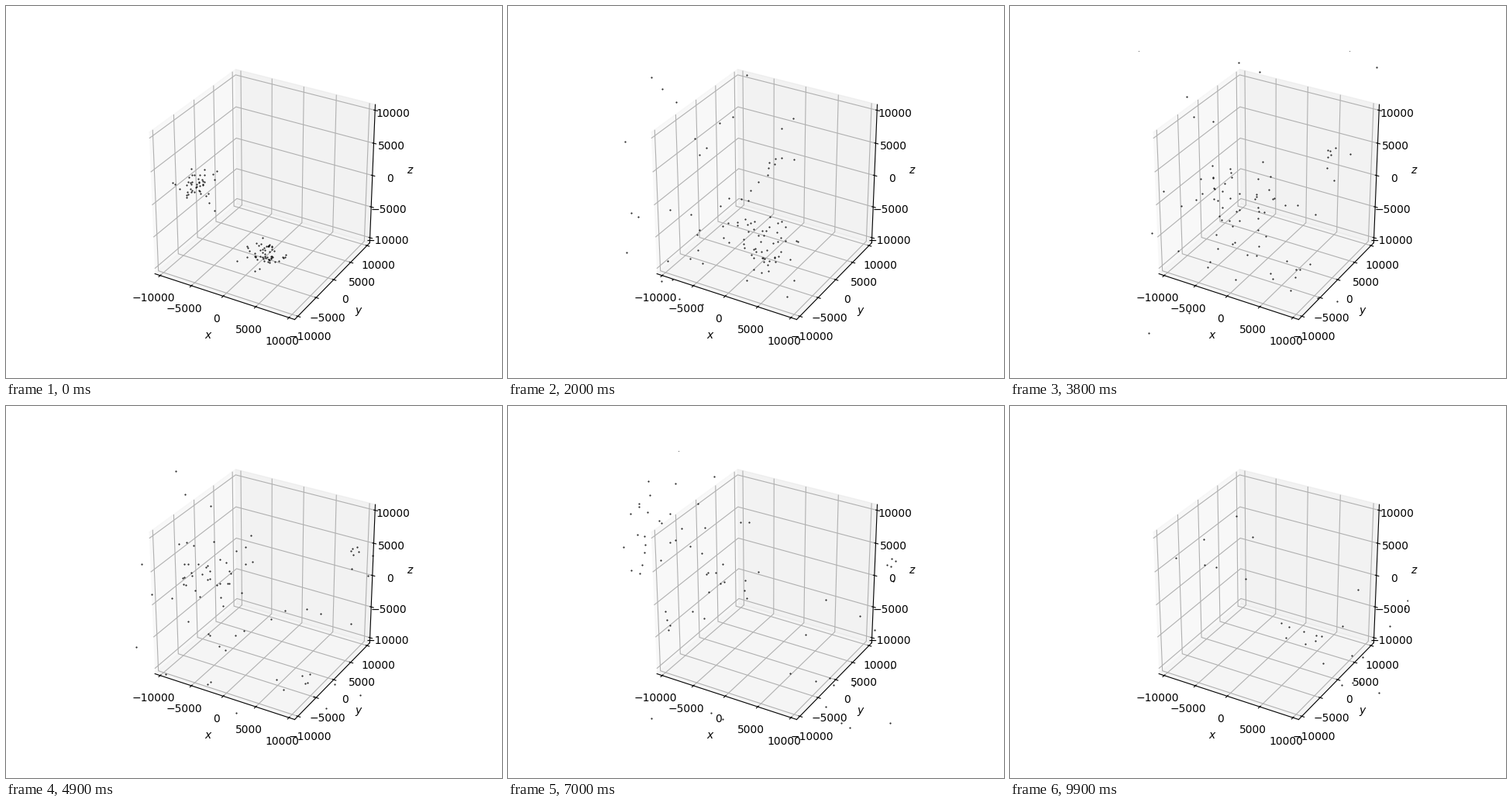
A matplotlib script that plays this animation: 640 by 480 pixels, repeating every 10000 ms.

```python
import numpy as np
import matplotlib.pyplot as plt
from matplotlib.animation import FuncAnimation

FRAMES, INTERVAL = 100, 100
TICK, PAD = 10000, 25 / 24
LIMIT = TICK * PAD ** 2
t = np.arange(FRAMES)[:, None, None]

rng = np.random.default_rng(11)

# View plane of the default camera (elev 30, azim -60)
RIGHT = np.array([np.sqrt(3) / 2, 0.5, 0])
UP = np.array([-0.25, np.sqrt(3) / 4, np.sqrt(3) / 2])
CENTRE = np.array([333.0, 237.4])
SCALE = 2 * TICK * PAD / 199.8

# Clusters on the stage: middle and spread in pixels
WEST = np.array([(247, 233), (14, 14)])
EAST = np.array([(333, 321), (13, 9)])


def to_space(p):
    """Stage pixels to data coordinates on the plane facing the camera."""
    u, v = np.moveaxis((p - CENTRE) * SCALE, -1, 0)
    return u[..., None] * RIGHT - v[..., None] * UP


def circle(angle):
    return np.stack([np.cos(angle), np.sin(angle)], -1)


def stream(n, home, velocity=(0, 0), pull=(0, 0), speed=(0, 0), growth=0, hold=0):
    """Bodies leaving a cluster together.

    speed is the range of each body's own random kick, growth widens the
    group, and hold is the time over which the cluster lets it go.
    """
    middle, spread = home
    kick = rng.uniform(*speed, (n, 1)) * circle(rng.uniform(0, 2 * np.pi, n))
    travel = (np.array(velocity) + kick) * t + np.array(pull) * t ** 2
    if hold:
        u = np.minimum(t / hold, 1)
        travel = travel * u * u * (3 - 2 * u)
    swirl = rng.uniform(0, 2 * np.pi, n) + t[..., 0] * rng.normal(0, 0.03, n)
    offset = rng.rayleigh(1, (n, 1)) * circle(swirl)
    return middle + travel + offset * (spread + growth * np.sqrt(t))


bodies = np.concatenate([
    # East: most drift to the upper left, the rest part in smaller groups
    stream(24, EAST, (-0.6, -1.2), (-0.022, -0.018), growth=2.2, hold=49),
    stream(9, EAST, (-3.36, -3.63), (0.04, 0.033), growth=1, hold=49),
    stream(8, EAST, (-1.5, -4.2), (0.008, 0.0265), growth=3.5, hold=49),
    stream(8, EAST, (1, 0.45), growth=4, hold=49),
    stream(6, EAST, pull=(-0.023, -0.01), growth=1, hold=49),
    # West: bursts apart, one group swings off to the right
    stream(7, WEST, (5.5, -1.9), (-0.028, 0.022)),
    stream(38, WEST, speed=(2, 8)),
], axis=1)
space = to_space(bodies)

fig = plt.figure(figsize=(6.4, 4.8), dpi=100)
ax = fig.add_subplot(projection="3d")
dots, = ax.plot(*space[0].T, "k.", markersize=1)

for name in "xyz":
    ax.set(**{f"{name}ticks": np.arange(-TICK, TICK + 1, 5000),
              f"{name}lim": (-LIMIT, LIMIT),
              f"{name}label": f"${name}$"})
# Unit cube
ax.set_box_aspect((1, 1, 1), zoom=np.sqrt(3) / 1.8294640721620434)


def update(i):
    dots.set_data_3d(*space[i].T)
    return dots,


anim = FuncAnimation(fig, update, frames=FRAMES, interval=INTERVAL,
                     repeat=True, repeat_delay=0, blit=False)
plt.show()
```
